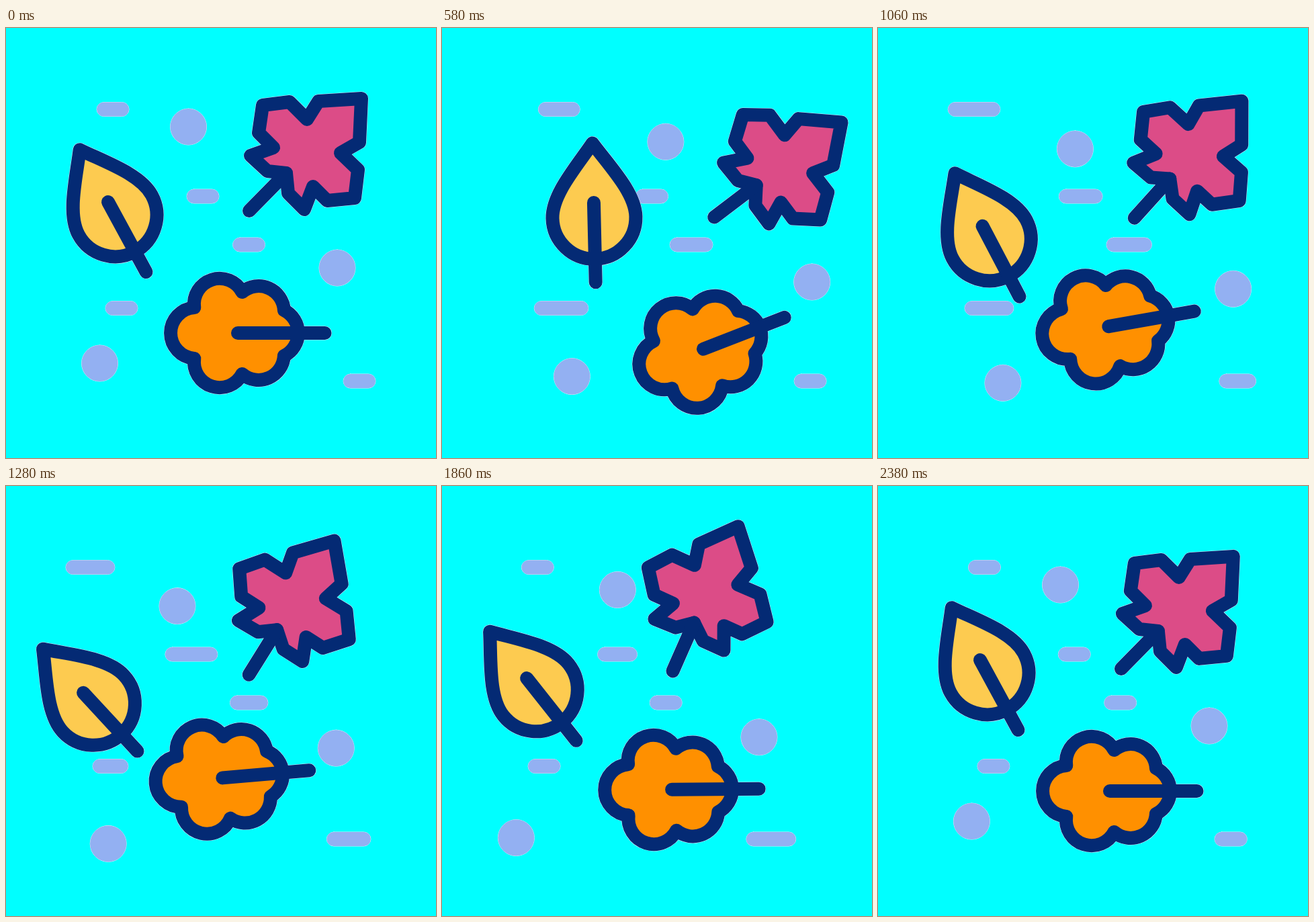
Animation of 640x640 px, one loop 2400 ms. Source, as an HTML page with a canvas:

```html
<!DOCTYPE html>
<html lang="en">
<head>
<meta charset="utf-8">
<title>Autumn leaves</title>
<style>
  html, body { margin: 0; width: 100%; height: 100%; overflow: hidden; background: #0ff; }
  canvas { display: block; }
</style>
</head>
<body>
<canvas id="stage" width="640" height="640"></canvas>
<script>
const ctx = document.getElementById('stage').getContext('2d');
const LOOP = 2400;
const NAVY = '#042a74', LILAC = '#93b0f2', HALO = '#dde6f6';

// Keys: [time, x, y, degrees, vertical bow of the path leading to the key]
const leaves = [
  {
    fill: '#fdcb50', tilt: 61.5,
    outline: new Path2D('M-88.6 0C-53.6-25-13.6-62 21.9-62A62 62 0 0 1 21.9 62C-13.6 62-53.6 25-88.6 0Z'),
    stem: new Path2D('M0 0H118.4'),
    keys: [[0, 152, 259, 0], [590, 226, 260, 27.2], [1450, 102.7, 310.6, -18.9, 6], [2300, 152, 259, 0]]
  },
  {
    fill: '#dc4c87', tilt: 0,
    outline: new Path2D('M-65-73L-25-78 1-52 18-79 82-83 79-18 51-2 77 23 72 65 31 69 10 48-3 82-27 58-30 28-58 25-83 2-49-10-71-32Z'),
    stem: new Path2D('M-85 84L-30 28'),
    keys: [[0, 447, 188, 0], [650, 503.2, 211.4, 8.6], [1700, 385, 163.5, -23.9], [2400, 447, 188, 0]]
  },
  {
    fill: '#ff9000', tilt: 0,
    outline: new Path2D('M-64.7 37.9A38 38 0 0 1-64.7-37.9A38 38 0 0 1 6.5-61A38 38 0 0 1 68.9-34' +
      'A38 38 0 0 1 68.9 34A38 38 0 0 1 6.5 61A38 38 0 0 1-64.7 37.9Z'),
    stem: new Path2D('M0 0H129.5'),
    keys: [[0, 345, 454, 0], [550, 389.3, 478, -21.3], [1400, 318.5, 433, -4, -5], [1980, 345, 454, 0]]
  }
];

// Dots share one path, each at its own pace
const dotKeys = [[0, 0, 0, 0], [800, 66, 24, 0], [1715, -33, 28.5, 0, 7], [2400, 0, 0, 0, -1.5]];
const dots = [[271.5, 147, 2080], [493, 357, 2240], [139.5, 499, 2400]];

// Dashes: rest position, then the offsets of both ends at dashTimes
const dashTimes = [0, 320, 860, 1280, 1640, 2060];
const dashes = [
  { x: 135, y: 121, left: [0, 21, -13, -46, -35, -1.5], right: [0, 21, 15, -21, -33, -1.5] },
  { x: 269, y: 250.5, left: [0, 6.5, 23.5, -32, -53, -18.5], right: [0, 6.5, 28, -2, -29, -18.5] },
  { x: 337.5, y: 322.5, left: [0, -2.5, 5, -4, -23.5, -26.5], right: [0, 1.5, 30.5, 4.5, -23.5, -26.5] },
  { x: 148, y: 417, left: [0, -2.5, -19, -19, -34, -5], right: [0, 16.5, 20, -14, -34, -5] },
  { x: 502, y: 525.5, left: [0, 11, 25, -24.5, -68, -24], right: [0, 11, 25, -7, -31, -12] }
];

const ease = u => u * u * (3 - 2 * u);

function pose(keys, t) {
  const i = keys.findIndex(k => k[0] > t);
  if (i < 0) return keys[keys.length - 1].slice(1, 4);
  const a = keys[i - 1], b = keys[i];
  const s = ease((t - a[0]) / (b[0] - a[0]));
  const [x, y, deg] = [1, 2, 3].map(n => a[n] + (b[n] - a[n]) * s);
  return [x, y + 4 * s * (1 - s) * (b[4] || 0), deg];
}

// Smooth periodic curve through the values at dashTimes
function curve(values, t) {
  const n = values.length;
  const value = i => values[(i + n) % n];
  const time = i => dashTimes[(i + n) % n] + LOOP * Math.floor(i / n);
  const slope = i => (value(i + 1) - value(i - 1)) / (time(i + 1) - time(i - 1));
  let i = n - 1;
  while (time(i) > t) i--;
  const span = time(i + 1) - time(i), u = (t - time(i)) / span, s = ease(u);
  return value(i) * (1 - s) + value(i + 1) * s +
    span * u * (1 - u) * (slope(i) * (1 - u) - slope(i + 1) * u);
}

function line(path, color, width) {
  ctx.strokeStyle = color;
  ctx.lineWidth = width;
  ctx.stroke(path);
}

function drawLeaf({ fill, tilt, outline, stem, keys }, t) {
  const [x, y, deg] = pose(keys, t);
  ctx.save();
  ctx.translate(x, y);
  ctx.rotate((tilt + deg) * Math.PI / 180);
  line(outline, HALO, 21);
  line(stem, HALO, 21);
  ctx.fillStyle = fill;
  ctx.fill(outline);
  line(outline, NAVY, 20);
  line(stem, NAVY, 20);
  ctx.restore();
}

function drawRound(x, y, width, height) {
  const path = new Path2D();
  path.roundRect(x, y, width, height, height / 2);
  line(path, HALO, 1);
  ctx.fillStyle = LILAC;
  ctx.fill(path);
}

function frame(now) {
  const t = now % LOOP;
  ctx.fillStyle = '#0ff';
  ctx.fillRect(0, 0, 640, 640);
  ctx.lineCap = ctx.lineJoin = 'round';
  for (const [x, y, duration] of dots) {
    const [dx, dy] = pose(dotKeys, t * LOOP / duration);
    drawRound(x + dx - 27, y + dy - 27, 54, 54);
  }
  for (const { x, y, left, right } of dashes) {
    const from = curve(left, t), to = curve(right, t);
    drawRound(x + from, y - 10.5, 48 + Math.max(0, to - from), 21);
  }
  for (const leaf of leaves) drawLeaf(leaf, t);
  requestAnimationFrame(frame);
}
requestAnimationFrame(frame);
</script>
</body>
</html>
```
